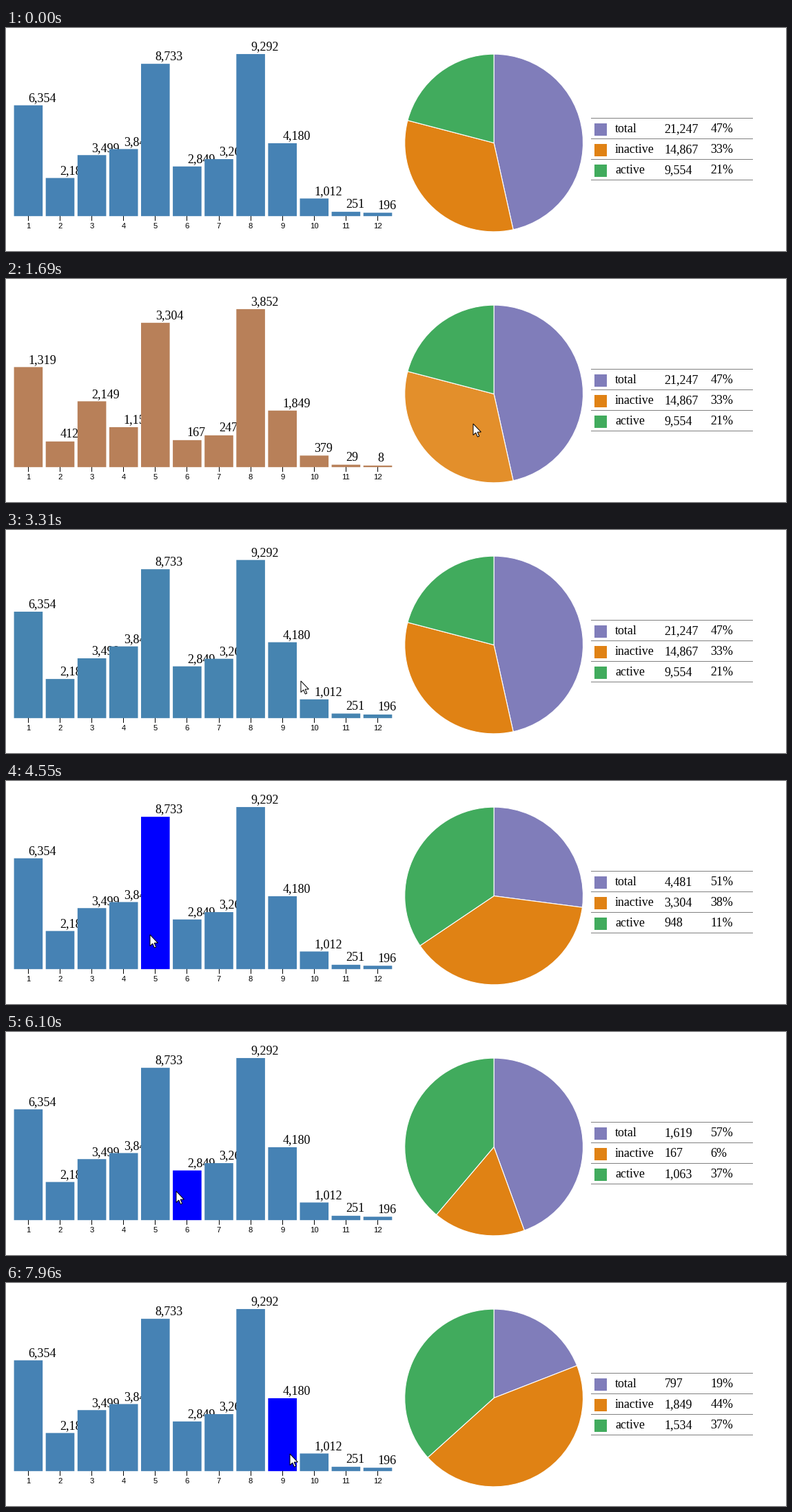
Write a matplotlib script that moves like this. It is 1132 px wide and 325 px high and loops after 8 s.

```python
from math import atan2, floor, hypot, tau

import numpy as np
import matplotlib.pyplot as plt
from matplotlib.animation import FuncAnimation
from matplotlib.colors import to_rgb
from matplotlib.patches import Polygon, Rectangle, Wedge

WIDTH, HEIGHT, DPI = 1132, 325, 100
PX = 72 / DPI
LOOP_MS, STEP_MS, EASE_MS = 8000, 20, 500
ENTER_MS, REFRESH_MS = 440, 77.53  # pointer appears; screen refresh period

NAMES = ["total", "inactive", "active"]
COLORS = np.array([to_rgb(c) for c in ("#807dba", "#e08214", "#41ab5d")])
BAR_COLOR = np.array(to_rgb("steelblue"))
DATA = np.array([
    [4786, 1101, 932, 832, 4481, 1619, 1819, 4498, 797, 162, 122, 98],
    [1319, 412, 2149, 1152, 3304, 167, 247, 3852, 1849, 379, 29, 8],
    [249, 674, 418, 1862, 948, 1063, 1203, 942, 1534, 471, 100, 90],
])
N_BARS = DATA.shape[1]

BAR_LEFT, BAR_STEP, BAR_WIDTH = 11.6, 46.1, 41.6
BASE_Y, PLOT_HEIGHT, LABEL_GAP = 274.2, 236.25, 5.6
PIE_X, PIE_Y, PIE_RADIUS = 708.1, 167.5, 129.4

# Pointer moves: (start ms, end ms, x, y); it rests in between
POINTER_START = np.array([752, 162])
MOVES = [
    (1370, 1454, 678, 211), (2070, 2215, 672, 109), (2868, 2931, 575, 118),
    (2931, 3308, 428, 220), (3308, 3608, 399, 226), (4000, 4549, 209, 224),
    (4549, 4880, 160, 229), (5505, 5853, 247, 232), (6600, 7664, 412, 249),
]
POINTER_SHAPE = np.array([(0, 0), (0, 16.5), (3.8, 13), (6.4, 19),
                          (8.8, 18), (6.2, 12.1), (11.4, 12)])


def ease(u):
    return 4 * u ** 3 if u < 0.5 else 1 - 4 * (1 - u) ** 3


def progress(t, start, duration):
    return min(max((t - start) / duration, 0), 1)


def bar_values(index):
    return DATA.sum(axis=0) if index is None else DATA[index]


def bar_target(index):
    """Bar heights followed by the bar colour."""
    values = bar_values(index)
    color = BAR_COLOR if index is None else COLORS[index]
    return np.concatenate([values / values.max() * PLOT_HEIGHT, color])


def slice_values(index):
    return DATA.sum(axis=1) if index is None else DATA[:, index]


def pie_target(index):
    """Where each slice ends, as a share of the circle."""
    values = slice_values(index)
    return np.cumsum(values) / values.sum()


def pointer_at(t):
    position = POINTER_START
    for start, end, x, y in MOVES:
        position = position + progress(t, start, end - start) * (np.array([x, y]) - position)
    return position


def slice_under(x, y):
    dx, dy = x - PIE_X, y - PIE_Y
    if hypot(dx, dy) > PIE_RADIUS:
        return None
    return int(np.searchsorted(pie_target(None), atan2(dx, -dy) / tau % 1))


def bar_under(x, y):
    i = floor((x - BAR_LEFT) / BAR_STEP)
    if 0 <= i < N_BARS and y > BASE_Y - bar_target(None)[i]:
        return i
    return None


def hover_changes(under):
    """List of (time, index) for each time the hovered item changes."""
    changes = [(0, None)]
    for t in range(ENTER_MS, LOOP_MS, 4):
        index = under(*pointer_at(t))
        if index != changes[-1][1]:
            changes.append((t, index))
    return changes


def hovered(changes, t):
    return [index for start, index in changes if start <= t][-1]


def transition(changes, target, t):
    """Eased value at t; each change interrupts the running transition."""
    value = target(None)
    ends = [start for start, _ in changes[1:]] + [LOOP_MS]
    for (start, index), end in zip(changes, ends):
        amount = ease(progress(min(t, end), start, EASE_MS))
        value = value + amount * (target(index) - value)
    return value


slice_changes, bar_changes = hover_changes(slice_under), hover_changes(bar_under)

fig = plt.figure(figsize=(WIDTH / DPI, HEIGHT / DPI), dpi=DPI, facecolor="white")
ax = fig.add_axes([0, 0, 1, 1])
ax.set(xlim=(0, WIDTH), ylim=(HEIGHT, 0))
ax.axis("off")


def write(x, y, text="", size=18, font="Liberation Serif", **style):
    return ax.text(x, y, text, fontsize=size * PX, family=font, color="black",
                   va="baseline", **style)


bars, bar_labels = [], []
for i in range(N_BARS):
    left = BAR_LEFT + i * BAR_STEP
    middle = left + BAR_WIDTH / 2
    # Every bar covers the label of the one before it
    bars.append(ax.add_patch(Rectangle((left, BASE_Y), BAR_WIDTH, 0, lw=0,
                                       snap=False, zorder=2 + i)))
    bar_labels.append(write(middle, 0, zorder=2.5 + i))
    write(middle, 292, str(i + 1), 11.25, "Liberation Sans", ha="center")
    ax.vlines(floor(middle) + 0.5, 274, 281, color="black", lw=PX, snap=False)

wedges = [ax.add_patch(Wedge((PIE_X, PIE_Y), PIE_RADIUS, 0, 1, ec="white", lw=1.125 * PX))
          for _ in NAMES]

ax.hlines(131.5 + 30 * np.arange(4), 849, 1084, color="#808080", lw=PX, snap=False)
counts, shares = [], []
for row, (name, color) in enumerate(zip(NAMES, COLORS)):
    y = 152 + 30 * row
    ax.add_patch(Rectangle((854, y - 13), 18, 18, fc=color, lw=0))
    write(884, y, name)
    counts.append(write(955.5, y))
    shares.append(write(1022.5, y))

pointer = ax.add_patch(Polygon(POINTER_SHAPE, fc="white", ec="black", lw=PX, zorder=30))


def draw(frame):
    # The screen refreshes less often than the animation ticks
    clock = (frame + 0.5) * STEP_MS
    t = max(0, ENTER_MS + (clock - ENTER_MS) // REFRESH_MS * REFRESH_MS)
    active_slice, active_bar = hovered(slice_changes, t), hovered(bar_changes, t)

    state = transition(slice_changes, bar_target, t)
    heights, color = state[:N_BARS], np.clip(state[N_BARS:], 0, 1)
    values = bar_values(active_slice)
    for i, (bar, label) in enumerate(zip(bars, bar_labels)):
        top = BASE_Y - heights[i]
        bar.set_y(top)
        bar.set_height(heights[i])
        bar.set_facecolor("blue" if i == active_bar else color)
        label.set_y(top - LABEL_GAP)
        label.set_text(f"{values[i]:,}")

    edges = 360 * np.append(0, transition(bar_changes, pie_target, t)) - 90
    parts = slice_values(active_bar)
    for i, wedge in enumerate(wedges):
        wedge.set_theta1(edges[i])
        wedge.set_theta2(edges[i + 1])
        opacity = 0.9 if i == active_slice else 1
        wedge.set_facecolor(1 - opacity * (1 - COLORS[i]))
        counts[i].set_text(f"{parts[i]:,}")
        shares[i].set_text(f"{parts[i] / parts.sum():.0%}")

    pointer.set_visible(t >= ENTER_MS)
    pointer.set_xy(POINTER_SHAPE + pointer_at(t))
    return []


animation = FuncAnimation(fig, draw, frames=LOOP_MS // STEP_MS, interval=STEP_MS,
                          init_func=lambda: draw(0), repeat=True, repeat_delay=0)
plt.show()
```
